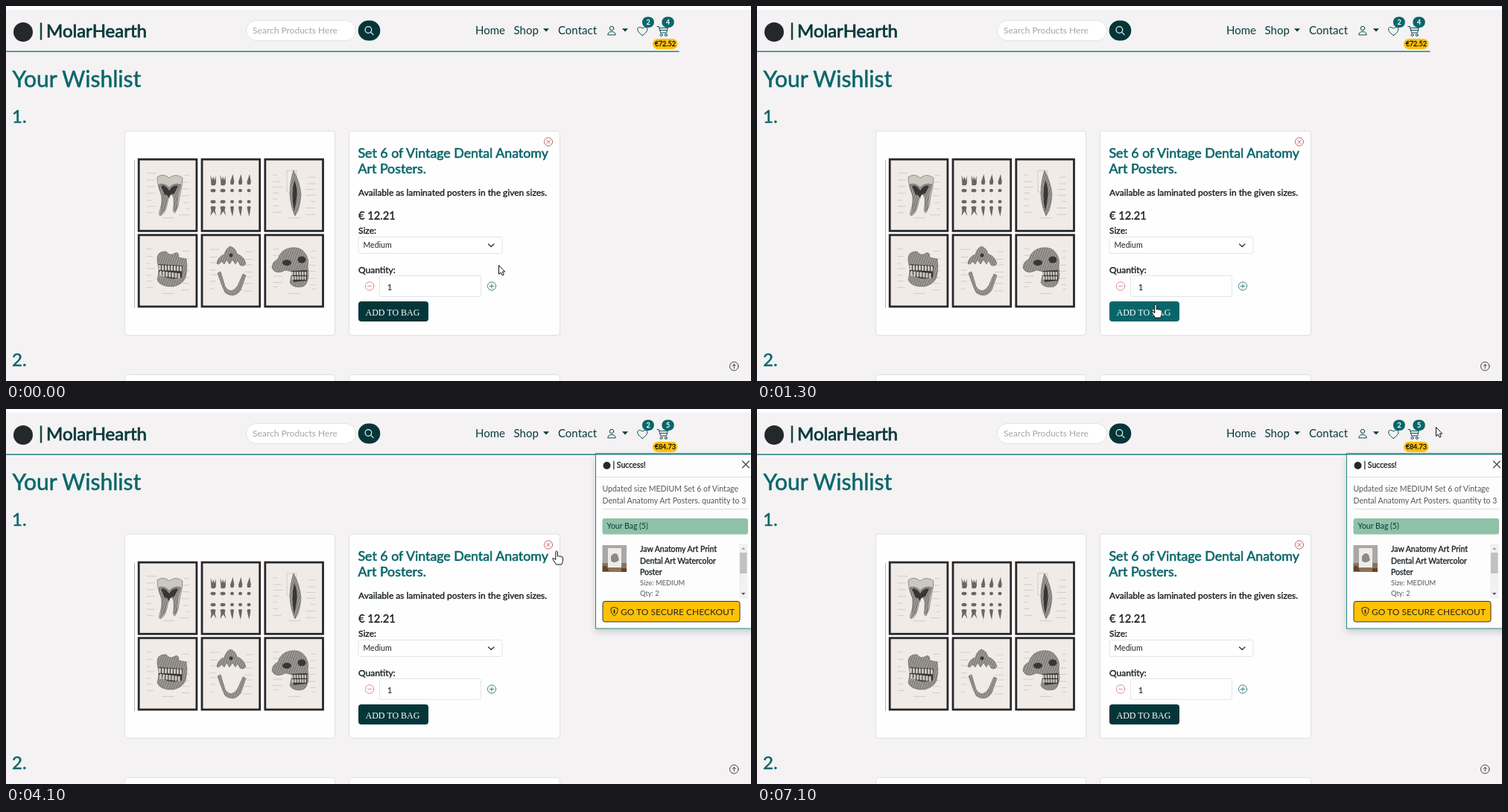
Recreate the animation shown at these times as an HTML page. Size 1000 by 504 pixels, loop 7200 ms.

```html
<!DOCTYPE html>
<html lang="en">
<head>
<meta charset="utf-8">
<title>Wishlist</title>
<style>
html, body { margin: 0; width: 100%; height: 100%; overflow: hidden; background: #f4f2f3; }
svg { display: block; width: 100vw; height: 100vh; }
text { font-family: Lato, sans-serif; fill: currentColor; white-space: pre; }
.b { stroke: currentColor; stroke-width: .033em; }
.t { color: #08666a; }
.d { color: #0a393c; }
.k { color: #1c2226; }
.g { color: #55585b; }
.m { text-anchor: middle; }
.serif { font-family: "Liberation Serif", serif; }
.line { fill: none; stroke-linecap: round; stroke-linejoin: round; }
.card { fill: #fefefe; stroke: #dfdfe1; }
.field { fill: #fff; stroke: #e2e4e8; }
</style>
</head>
<body>
<svg viewBox="0 0 1000 504" preserveAspectRatio="none">
  <defs>
    <pattern id="hatch" width="3" height="3" patternUnits="userSpaceOnUse" patternTransform="rotate(20)">
      <rect width="3" height="3" fill="#aaa6a1"/><path d="M1 0v3" stroke="#6b6765" stroke-width="1.200"/>
    </pattern>
    <filter id="shadow" x="-10%" y="-10%" width="120%" height="125%">
      <feDropShadow dx="0" dy="4" stdDeviation="4" flood-opacity=".16"/>
    </filter>
  </defs>
  <rect width="1000" height="504" fill="#f4f2f3"/>
  <rect width="1000" height="5" fill="#fefefe"/>

  <!-- navigation -->
  <rect y="60.4" width="903.5" height="1.5" fill="#25817e"/>
  <circle cx="23" cy="35" r="13" fill="#25282a"/>
  <g class="d">
    <text class="b" x="44" y="41" font-size="24">|</text>
    <text class="b" x="54" y="41.5" font-size="24">MolarHearth</text>
    <g font-size="15">
      <text x="630" y="38.2">Home</text>
      <text x="681.5" y="38.2">Shop</text>
      <text x="741" y="38.2">Contact</text>
    </g>
  </g>
  <path d="M721 30.300h8l-4 4.200zM827 30.300h8l-4 4.200z" fill="#0a393c"/>
  <rect x="322.5" y="19.5" width="147" height="27" rx="13.5" class="field"/>
  <text x="331" y="37.2" font-size="12" color="#a3a5aa">Search Products Here</text>
  <rect x="472.7" y="19.500" width="29.600" height="27" rx="13.500" fill="#043639"/>
  <g class="line" stroke="#e9f1f1" stroke-width="1.2"><circle cx="486.4" cy="32" r="4.3"/><path d="M489.6 35.2l3.4 3.4"/></g>
  <g class="line" stroke="#0a4d50">
    <circle cx="813" cy="30" r="2.7"/><path d="M807.8 38.5q.2-4 5.2-4t5.2 4z"/>
    <path d="M854.3 39.5c-11-7-6.500-14.500 0-9.300c6.500-5.200 11 2.300 0 9.300z"/>
    <path d="M874 27.500h2.300l2.300 8.500h8l1.800-6.500h-11.500M877.500 32.500h10"/>
    <circle cx="879.5" cy="39" r="1.5"/><circle cx="885.8" cy="39" r="1.5"/>
  </g>
  <g fill="#08666a"><rect x="853.900" y="14.500" width="16" height="14.500" rx="7.200"/><rect x="880.300" y="14.500" width="16.500" height="14.500" rx="7.200"/></g>
  <rect x="868" y="44" width="33.500" height="14" rx="7" fill="#ffc107"/>
  <g class="m b" font-size="9">
    <text x="862" y="25" color="#fff">2</text>
    <text id="count" x="888.5" y="25" color="#fff"></text>
    <text id="total" x="884.8" y="54.300" color="#111"></text>
  </g>

  <!-- wishlist -->
  <g class="t b">
    <text x="8.5" y="108.5" font-size="30">Your Wishlist</text>
    <text x="8" y="156.500" font-size="24">1.</text>
    <text x="8" y="484" font-size="24">2.</text>
  </g>
  <rect x="159.5" y="168" width="282" height="274.5" rx="4" class="card"/>
  <rect x="460.5" y="168" width="283" height="274.5" rx="4" class="card"/>
  <rect x="159.5" y="495.5" width="282" height="40" rx="4" class="card"/>
  <rect x="460.5" y="495.5" width="283" height="40" rx="4" class="card"/>

  <path d="M172.5 207v199" stroke="#b5b5b5"/>
  <g id="frames"></g>
  <g id="labels" stroke="#c3beb8" stroke-width=".7"></g>
  <g fill="url(#hatch)" stroke="#66625f" stroke-width=".6">
    <path fill="#cbc7c1" d="M203 230q8-6 16 1q9-7 18 0q0 8-3 20l-3 18-4 9q-4 0-2-9l1-15q-4-9-7 0l-3 14q-3 12-9 14q-3-1 0-9q4-12 1-22q-5-9-5-21z"/>
    <path d="M205 240q7-3 14 4q7-7 16-4l-4 14-2 19-3 3-1-18q-4-11-8-1l-4 17-6 7q3-16 2-26q-4-8-4-15z"/>
    <path d="M386 221q9 17 10 33q-1 12-4 21l-4 7q-6-12-7-29q0-18 5-32z"/>
    <path d="M203 342q-1-13 12-12q5 7 12 2q5-2 5 6l10 2q2 13-1 25q-4 9-16 12q-18 1-22-9q2-8 2-14z"/>
    <path d="M283 346q2-10 10-12q2-8 8-11q7 2 9 10q9 3 12 13q-3 5-8 2l-3-6-3 5-4-6-4 6-4-6-3 6-4-4q-3 6-6 3z"/>
    <path d="M284 359l4-2 6 20q8 12 17-1l7-16 4 2-7 20q-9 12-21 3q-4-8-10-26z"/>
    <path d="M357 352q0-8 8-12q4-13 17-15q14-2 20 8q5 8 3 16l1 12q-1 13-7 16q-13 3-18-5l3-15-9-2q-13 7-18-3z"/>
  </g>
  <g fill="#393635">
    <path d="M208 242q5-3 11 6q6-9 12-6l-5 10q-7 1-7 7-3-7-6-5z"/>
    <path d="M387 234q6 13 2 31l-2 11q-5-22 0-42z"/>
    <ellipse cx="397" cy="341" rx="5.500" ry="4.500"/><ellipse cx="377" cy="345" rx="6" ry="4"/>
    <path d="M205 347l32 2-1 16q-22 5-31-8z"/><circle cx="302" cy="335" r="2.500"/><path d="M383 356l21-1v14l-18 2z"/>
  </g>
  <g id="teeth"></g>

  <g class="t b" font-size="17.800">
    <text x="472.500" y="204">Set 6 of Vintage Dental Anatomy</text>
    <text x="472.5" y="225">Art Posters.</text>
  </g>
  <rect x="473" y="310.500" width="193" height="22" rx="2" class="field"/>
  <rect x="501.500" y="362.500" width="136" height="28" rx="2" class="field"/>
  <g class="k">
    <g class="b" font-size="12">
      <text x="473" y="254.500">Available as laminated posters in the given sizes.</text>
      <text x="473" y="287" font-size="14.700">€ 12.21</text>
      <text x="473" y="305.500">Size:</text>
      <text x="473" y="358.500">Quantity:</text>
    </g>
    <text x="479.500" y="325" font-size="10.500">Medium</text>
    <text x="511.500" y="381.500" font-size="12">1</text>
  </g>
  <path class="line" d="M647.500 320l3.700 3.500 3.700-3.500" stroke="#343a40" stroke-width="1.400"/>
  <g class="line" stroke-width=".9">
    <path d="M725.800 180.300l4.400 4.400m0-4.400l-4.400 4.400" stroke="#b9585b"/><circle cx="728" cy="182.500" r="5.600" stroke="#b9585b"/>
    <path d="M485.500 376.500h5" stroke="#d98387"/><circle cx="488" cy="376.500" r="5.800" stroke="#d98387"/>
    <path d="M649.200 376.500h5.600m-2.800-2.800v5.600" stroke="#2d7477"/><circle cx="652" cy="376.500" r="5.600" stroke="#2d7477"/>
    <path d="M977.300 487v-5.500m-2.300 2.300l2.300-2.300 2.300 2.300" stroke="#333"/><circle cx="977.300" cy="484.200" r="5.800" stroke="#333"/>
  </g>
  <rect id="add" x="473" y="397" width="94" height="27" rx="4"/>
  <text id="addText" class="serif" x="482.500" y="416.200" font-size="12">ADD TO BAG</text>

  <!-- bag notice -->
  <g id="toast">
    <rect x="791.500" y="60" width="220" height="235" fill="#fdfdfd" stroke="#2b8581" filter="url(#shadow)"/>
    <path d="M791 60.700h209" stroke="#25817e" stroke-width="1.800"/>
    <path d="M792 91.500h208M801 134.500h195" stroke="#dcdddd"/>
    <circle cx="806.500" cy="76" r="5" fill="#25282a"/>
    <text class="k b" x="814.500" y="79" font-size="10.500">| Success!</text>
    <path class="line" d="M988.500 70l9 9m0-9l-9 9" stroke="#444" stroke-width="1.200"/>
    <g class="g" font-size="10.500">
      <text x="800.500" y="111">Updated size MEDIUM Set 6 of Vintage</text>
      <text x="800.500" y="127">Dental Anatomy Art Posters. quantity to 3</text>
    </g>
    <rect x="800.500" y="147" width="195.500" height="21.500" rx="3" fill="#8fc2a9"/>
    <text class="d" x="806.500" y="161" font-size="10.500">Your Bag (5)</text>
    <rect x="800.500" y="183" width="32.500" height="36" fill="#aaa8a5"/>
    <path d="M800.500 207h32.500v12h-32.500z" fill="#8d7358"/>
    <path d="M808 187h18v26h-18z" fill="#eeece8"/>
    <path d="M812 198q5-7 9-2l2 7q-6 6-11 1z" fill="#8b8989"/>
    <path d="M801 212q5-5 8 6h-8zM826 214h7v5h-7z" fill="#5e4430"/>
    <g class="k b" font-size="10.500">
      <text x="851" y="192">Jaw Anatomy Art Print</text>
      <text x="851" y="207.500">Dental Art Watercolor</text>
      <text x="851" y="223">Poster</text>
    </g>
    <text class="g" x="851" y="237" font-size="9.300">Size: MEDIUM</text>
    <text class="g" x="851" y="251" font-size="9.300">Qty: 2</text>
    <rect x="984" y="181" width="11.500" height="74" fill="#f1f1f1"/>
    <rect x="985" y="193" width="9.500" height="28" fill="#c1c1c1"/>
    <path d="M987 189l2.700-3 2.700 3z" fill="#a3a3a3"/><path d="M987 247l2.700 3 2.700-3z" fill="#505050"/>
    <rect x="801" y="258.500" width="184" height="27.500" rx="3" fill="#ffc107" stroke="#3c3518"/>
    <g class="line" stroke="#2a2a1c"><path d="M816.500 266.500l4.500 1.500q.5 7-4.500 10q-5-3-4.500-10z"/><path d="M816.500 270.500v3.500" stroke-width="1.800"/></g>
    <text x="825" y="276.500" font-size="12" color="#252620">GO TO SECURE CHECKOUT</text>
  </g>

  <g id="pointer" fill="#fff" stroke="#111" stroke-linejoin="round">
    <path id="arrow" d="M.5.5v12l2.800-2.400 1.900 4 2-1-1.900-3.900h3.400z"/>
    <path id="hand" d="M-1.200 1q1.200-2.500 2.500 0v6q1.200-1.300 2.500.2q1.300-1 2.500.4q2.200-.6 2.200 1.800v4l-1.800 4.600h-7.200l-4-6.200q-1.800-2.800.4-2.300l2.900 2z"/>
  </g>
</svg>
<script>
const $ = id => document.getElementById(id);

// Posters: frames, the chart of teeth and the caption strokes
let seed = 7;
const rand = () => (seed = seed * 16807 % 2147483647) / 2147483647;
let frames = '', labels = '', teeth = '';
for (let n = 0; n < 6; n++) {
  const col = n % 3, x = 176.8 + col * 84.8, y = 204.700 + (n > 2) * 101.7;
  frames += `<rect x="${x + 1.4}" y="${y + 1.4}" width="77.700" height="96.200" fill="#f0ebe6" stroke="#28272a" stroke-width="2.800"/>`;
  if (n === 1) continue;
  for (let i = 0; i < 7; i++) {
    const h = y + 20 + i * 8.5 + rand() * 3;
    labels += `<path d="M${x + 12} ${h}h${4 + rand() * 10}M${x + 69} ${h + 3}h${-4 - rand() * 10}"/>`;
  }
  labels += `<path d="M${x + 33} ${y + 80}h16"/>`;
}
labels += '<path d="M377 221h13v29h-13z" fill="none"/>';

[278, 291, 303.5, 314.5, 326].forEach((x, c) => {
  const molar = c < 2;
  for (const y of [248, 263])
    teeth += `<ellipse cx="${x}" cy="${y}" rx="${molar ? 3.5 : 2.5}" ry="2.300"/>`;
  teeth += molar
    ? `<path d="M${x - 3.5} 227l2.500 7 1-5 2 5 1.500-6 .5 10-1.500 3h-5z"/><path d="M${x - 3.5} 270q3.500-2 7 0l-1 5 2 7-4-6-4 6 1-7z"/>`
    : `<path d="M${x + 1} 226l1.800 10-.8 4h-4l-.5-4z"/><path d="M${x - 2.500} 270q2.500-2 5 0l-1 7-1 6-2-7z"/>`;
  labels += `<path d="M${x - .5} 221h1M${x - .5} 242h1M${x - .5} 255h1M${x - .5} 286h1"/>`;
});
// Teeth along the jaws
const bite = (x, y, n, dx, dy, h) => {
  for (let i = 0; i < n; i++)
    teeth += `<rect x="${x + i * dx}" y="${y + i * dy}" width="${dx * .75}" height="${h}" rx="1" fill="#c9c4bd"/>`;
};
bite(205, 348, 8, 4, .2, 7);
bite(206, 356, 7, 4.1, .5, 7);
bite(383, 357, 6, 3.5, 0, 5);
bite(384, 363, 6, 3.3, 0, 5);
$('frames').innerHTML = frames;
$('labels').innerHTML = labels;
$('teeth').innerHTML = `<g fill="#6b6663">${teeth}</g>`;

// Pointer path: time, x, y
const path = [
  [0, 661, 348], [700, 535, 401], [1900, 535, 401], [2500, 549, 304], [2800, 549, 304],
  [2900, 551, 298], [3600, 702, 213], [4000, 739, 191], [4900, 739, 191],
  [5800, 990, 62], [6200, 948, 40], [6600, 948, 40], [7100, 911, 24], [7200, 911, 24]
];
const show = (id, on) => $(id).style.display = on ? '' : 'none';

function draw(now) {
  const t = Math.floor(now % 7200 / 100) * 100;   // ten pictures a second
  const i = path.findIndex(p => p[0] > t);
  const [t0, x0, y0] = path[i - 1], [t1, x1, y1] = path[i];
  const k = (t - t0) / (t1 - t0), x = x0 + (x1 - x0) * k, y = y0 + (y1 - y0) * k;
  const overAdd = x > 473 && x < 567 && y > 396 && y < 425;
  const overRemove = Math.abs(x - 732) < 11 && Math.abs(y - 186) < 11;
  const done = t >= 2000, pressed = t >= 900 && !done, pale = overAdd && !pressed && !done;

  $('pointer').setAttribute('transform', `translate(${x} ${y})`);
  show('hand', overAdd || overRemove);
  show('arrow', !overAdd && !overRemove);
  show('toast', done);
  $('count').textContent = done ? 5 : 4;
  $('total').textContent = done ? '€84.73' : '€72.52';
  $('add').setAttribute('fill', pale ? '#93bec1' : pressed ? '#08666a' : '#043639');
  $('add').setAttribute('stroke', pale ? '#6c9fa3' : 'none');
  $('addText').setAttribute('color', pale ? '#5f7f82' : '#fff');
  requestAnimationFrame(draw);
}
draw(0);
</script>
</body>
</html>
```
